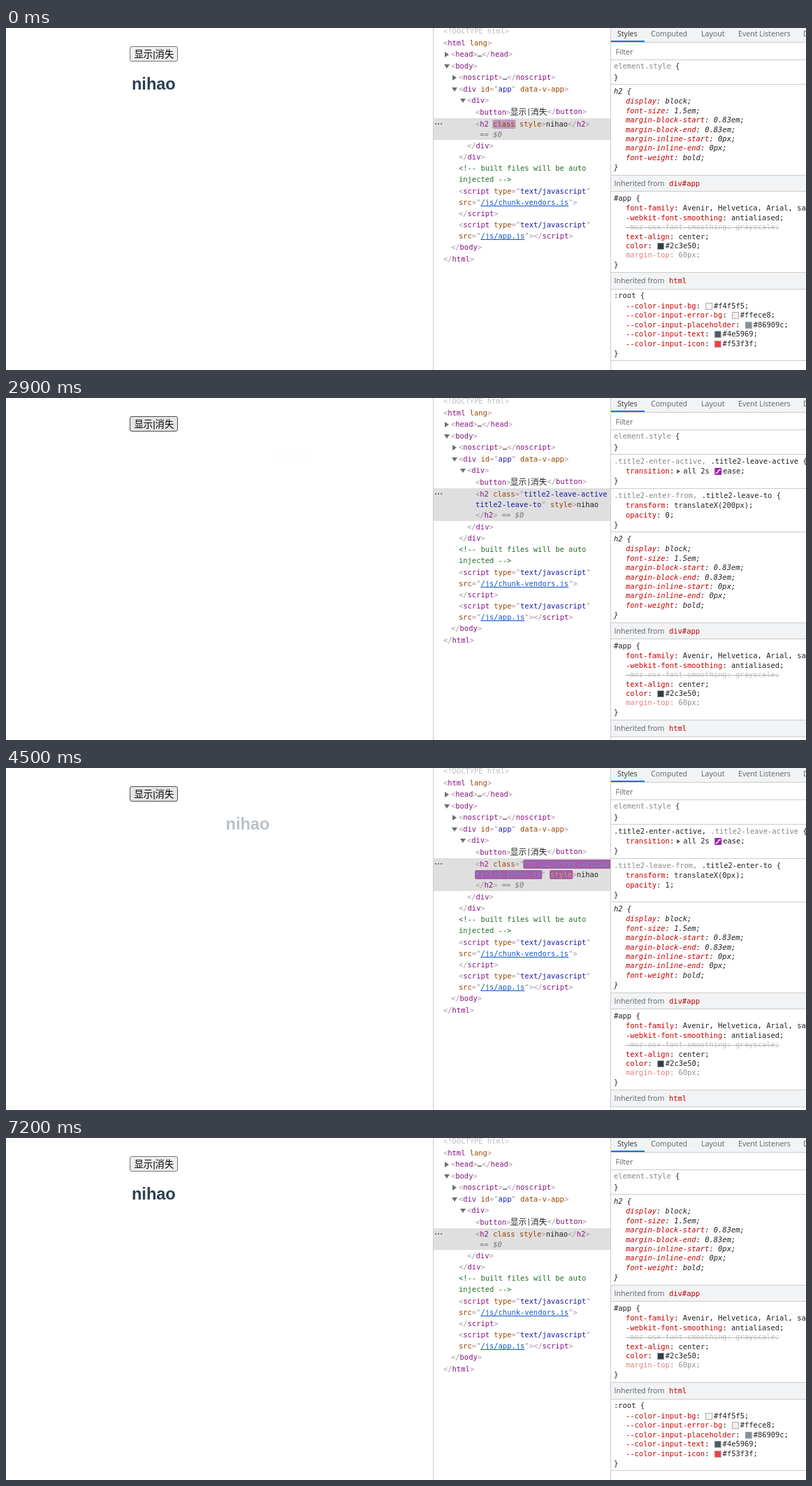
Animation of 1145 by 489 pixels, one loop 7400 ms. Source, as an HTML page with a canvas:

```html
<!DOCTYPE html>
<html lang="en">
<head>
<meta charset="utf-8">
<title>Transition inspector</title>
<style>
html, body { margin: 0; width: 100%; height: 100%; overflow: hidden; background: #fff; }
canvas { display: block; }
</style>
</head>
<body>
<canvas id="stage" width="1145" height="489"></canvas>
<script>
const ctx = document.getElementById('stage').getContext('2d');
const LOOP = 7400, STEP = 100, CELL = 6.29;
const MONO = '10.45px "DejaVu Sans Mono", monospace';
const UI = '10.6px "Open Sans", sans-serif';
const CJK = '"Noto Sans CJK SC", "Noto Sans CJK", sans-serif';

// One-letter colour codes used after "~" in marked-up text; capitals flash.
const INK = {
  b: '#a894a6', t: '#881280', a: '#994500', v: '#1a1aa6', c: '#236e25', l: '#1155cc',
  d: '#c0c0c0', g: '#777', s: '#777', x: '#222', u: '#888', p: '#c80000'
};

// The inspected element in each phase of the transition.
const classed = kind => [
  `~b<~th2 ~aclass~b="~Vtitle2-${kind}-active `,
  `~Vtitle2-${kind}-to~b" ~${kind === 'enter' ? 'A' : 'a'}style~b>~xnihao`,
  '~b</~th2~b>~g == ~s$0'
];
const SHOWN = ['~b<~th2 ~Aclass~a style~b>~xnihao~b</~th2~b>', '~g == ~s$0'];
const HIDDEN = ['~b<~th2 ~Aclass~a style~b="~Vdisplay: non', '~Ve;~b">~xnihao~b</~th2~b>~g == ~s$0'];
const PHASES = [
  { at: -1000, rows: SHOWN, kind: 'shown' },
  { at: 1300, rows: classed('leave'), kind: 'leave' },
  { at: 3100, rows: HIDDEN, kind: 'hidden' },
  { at: 4200, rows: classed('enter'), kind: 'enter' },
  { at: 6100, rows: SHOWN, kind: 'shown' }
];

// Rows above and below the inspected element: x, marked-up text, arrow.
const ABOVE = [
  [626, '~d<!DOCTYPE html>'],
  [626, '~b<~thtml ~alang~b>'],
  [637, '~b<~thead~b>~x…~b</~thead~b>', 'right'],
  [637, '~b<~tbody~b>', 'down'],
  [648, '~b<~tnoscript~b>~x…~b</~tnoscript~b>', 'right'],
  [648, '~b<~tdiv ~aid~b="~vapp~b" ~adata-v-app~b>', 'down'],
  [660, '~b<~tdiv~b>', 'down'],
  [672, '~b<~tbutton~b>']
];
const SCRIPT = '~b<~tscript ~atype~b="~vtext/javascript~b"';
const BELOW = [
  [660, '~b</~tdiv~b>'],
  [648, '~b</~tdiv~b>'],
  [648, '~c<!-- built files will be auto'],
  [648, '~cinjected -->'],
  [648, SCRIPT],
  [648, '~asrc~b="~l/js/chunk-vendors.js~b">'],
  [648, '~b</~tscript~b>'],
  [648, SCRIPT],
  [648, '~asrc~b="~l/js/app.js~b"></~tscript~b>'],
  [637, '~b</~tbody~b>'],
  [626, '~b</~thtml~b>']
];

// Declarations: "/" is struck out, "?" is faded.
const H2 = ['display: block;', 'font-size: 1.5em;', 'margin-block-start: 0.83em;',
  'margin-block-end: 0.83em;', 'margin-inline-start: 0px;', 'margin-inline-end: 0px;',
  'font-weight: bold;'];
const APP = ['font-family: Avenir, Helvetica, Arial, sans-serif;', '-webkit-font-smoothing: antialiased;',
  '?/-moz-osx-font-smoothing: grayscale;', 'text-align: center;', 'color: #2c3e50;', '?margin-top: 60px;'];
const ROOT = ['--color-input-bg: #f4f5f5;', '--color-input-error-bg: #ffece8;',
  '--color-input-placeholder: #86909c;', '--color-input-text: #4e5969;', '--color-input-icon: #f53f3f;'];

function rect(x, y, w, h, color) {
  ctx.fillStyle = color;
  ctx.fillRect(x, y, w, h);
}

function text(str, x, y, color, font = MONO) {
  ctx.font = font;
  ctx.fillStyle = color;
  ctx.fillText(str, x, Math.round(y) + (font.includes('Mono') ? 3 : 4));
}

function shape(color, ...points) {
  ctx.fillStyle = color;
  ctx.beginPath();
  points.forEach(([x, y]) => ctx.lineTo(x, y));
  ctx.fill();
}

function box(x, y, w, h, r, fill, stroke) {
  ctx.beginPath();
  ctx.roundRect(x, y, w, h, r);
  ctx.fillStyle = fill;
  ctx.fill();
  if (!stroke) return;
  ctx.strokeStyle = stroke;
  ctx.lineWidth = 1;
  ctx.stroke();
}

function marked(str, x, y, { italic = false, age = Infinity } = {}) {
  for (const part of str.split('~').slice(1)) {
    const code = part[0], body = part.slice(1), key = code.toLowerCase();
    const width = body.length * CELL;
    const flashing = code !== key && age < 1100;
    if (flashing) {
      ctx.globalAlpha = 1 / (1 + 1.8 * age / 1000);
      box(x - 1, y - 7, width + 2, 13, 2, '#881a88');
      ctx.globalAlpha = 1;
    }
    const font = (italic || key === 's' ? 'italic ' : '') + MONO;
    text(body, x, y, INK[key], font);
    if (flashing) {
      ctx.globalAlpha = Math.max(0, 1 - age / 600);
      text(body, x, y, '#fff', font);
      ctx.globalAlpha = 1;
    }
    if (key === 'l') rect(x, y + 4, width, 1, INK.l);
    x += width;
  }
}

function ease(t) {
  t = Math.min(1, Math.max(0, t));
  const cubic = (s, a, b) => 3 * (1 - s) ** 2 * s * a + 3 * (1 - s) * s * s * b + s ** 3;
  let lo = 0, hi = 1;
  for (let i = 0; i < 24; i++) {
    const mid = (lo + hi) / 2;
    if (cubic(mid, 0.25, 0.25) < t) lo = mid; else hi = mid;
  }
  return cubic(lo, 0.1, 1);
}

function drawPage(t, kind) {
  const hover = (t >= 500 && t < 4000) || (t >= 4200 && t < 6400);
  box(177.5, 26.5, 68, 21, 2.5, hover ? '#e5e5e5' : '#efefef', hover ? '#4f4f4f' : '#767676');
  text('显示|消失', 183.5, 38, '#000', `13.33px "Liberation Sans", ${CJK}`);

  let away = 0;
  if (kind === 'leave') away = ease((t - 1200) / 2000);
  if (kind === 'enter') away = 1 - ease((t - 4100) / 1870);
  if (kind === 'hidden') away = 1;
  ctx.globalAlpha = 1 - away;
  text('nihao', 180 + 200 * away, 84, '#2c3e50', 'bold 23.5px "Liberation Sans", Arial, sans-serif');
  ctx.globalAlpha = 1;
}

function drawElements(phase, age) {
  const { rows } = phase;
  rect(611, 0, 1, 489, '#ccc');
  rect(612, 129, 253, rows.length === 3 ? 47 : 31, '#dfdfdf');
  for (let i = 0; i < 3; i++) rect(614 + i * 4, 136, 2, 2, '#777');

  ABOVE.forEach(([x, str, arrow], i) => {
    const y = Math.round(5 + i * 16.5);
    marked(str, x, y);
    if (arrow === 'right') shape('#6e6e6e', [x - 9, y - 4], [x - 3, y], [x - 9, y + 4]);
    if (arrow === 'down') shape('#6e6e6e', [x - 10, y - 3], [x - 2, y - 3], [x - 6, y + 3]);
  });
  text('显示', 721.8, 120, INK.x, '11.7px ' + CJK);
  text('|', 745, 120, INK.x);
  text('消失', 751, 120, INK.x, '11.7px ' + CJK);
  marked('~b</~tbutton~b>', 774.5, 120);

  rows.forEach((str, i) => marked(str, 672, Math.round(137.6 + i * 15.4), { age }));
  const top = rows.length === 3 ? 185 : 169;
  BELOW.forEach(([x, str], i) => marked(str, x, Math.round(top + i * 16.15)));
}

function swatch(x, y, color) {
  rect(x + 1, y - 5, 10, 10, '#aaa');
  rect(x + 2, y - 4, 8, 8, color);
}

function declaration(line, y, italic) {
  const flags = line.match(/^[?\/]*/)[0];
  const body = line.slice(flags.length);
  const faded = flags.includes('?'), struck = flags.includes('/');
  const font = (italic ? 'italic ' : '') + MONO;
  const split = body.indexOf(':');
  const gray = faded && struck;
  let x = 887;
  ctx.globalAlpha = faded ? 0.5 : 1;
  text(body.slice(0, split), x, y, gray ? '#888' : INK.p, font);
  x += split * CELL;
  for (const part of body.slice(split).split(/(▸ |#\w{6};|ease;)/)) {
    if (part === '▸ ') {
      shape('#555', [x + 4, y - 3], [x + 9, y], [x + 4, y + 3]);
      x += 13;
      continue;
    }
    if (part[0] === '#') {
      swatch(x, y, part.slice(0, 7));
      x += 12.8;
    } else if (part === 'ease;') {
      box(x + 1, y - 5, 10, 10, 1, '#9c27b0');
      ctx.strokeStyle = '#fff';
      ctx.lineWidth = 1.3;
      ctx.beginPath();
      ctx.moveTo(x + 2.5, y + 2.5);
      ctx.bezierCurveTo(x + 8, y + 2.5, x + 4, y - 2.5, x + 9.5, y - 2.5);
      ctx.stroke();
      x += 13;
    }
    text(part, x, y, gray ? '#888' : INK.x, font);
    x += part.length * CELL;
  }
  if (struck) rect(887, y, body.length * CELL, 1, gray ? '#777' : '#222');
  ctx.globalAlpha = 1;
}

function drawStyles(t, kind) {
  rect(865, 0, 1, 489, '#ccc');
  rect(866, 0, 279, 489, '#fff');
  rect(866, 0, 279, 20, '#f1f3f4');
  rect(866, 20, 279, 1, '#ccc');
  rect(866, 18, 48, 2, '#1a73e8');
  [['Styles', 875], ['Computed', 923], ['Layout', 995], ['Event Listeners', 1048], ['DOM', 1141]]
    .forEach(([label, x], i) => text(label, x, 8, i ? '#5f6368' : '#333', UI));
  text('Filter', 872.5, 34, '#5f6368', UI);

  let y = 45;
  const rule = () => rect(866, Math.round(y), 279, 1, '#ccc');
  const section = (selector, lines, italic = false) => {
    marked(selector + ' ~x{', 870, Math.round(y + 10.3), { italic });
    lines.forEach((line, i) => declaration(line, Math.round(y + 25 + i * 13.4), italic));
    marked('~x}', 870, Math.round(y + 25.5 + lines.length * 13.4), { italic });
    y += 35.4 + lines.length * 13.4;
    rule();
  };
  const inherited = name => {
    rect(866, Math.round(y) + 1, 279, 23, '#f1f3f4');
    text('Inherited from', 870.5, y + 12, '#5f6368', UI);
    text(name, 949, y + 13, INK.p);
    y += 23.8;
    rule();
  };

  rule();
  section('~uelement.style', kind === 'hidden' ? ['display: none;'] : []);
  if (kind === 'leave' || kind === 'enter') {
    const entering = kind === 'enter';
    const pair = (first, second, firstOn) =>
      `~${firstOn ? 'x' : 'u'}.title2-${first}, ~${firstOn ? 'u' : 'x'}.title2-${second}`;
    section(pair('enter-active', 'leave-active', entering), ['transition:▸ all 2s ease;']);
    if (entering || t < 1400)
      section(pair('leave-from', 'enter-to', !entering), ['transform: translateX(0px);', 'opacity: 1;']);
    else
      section(pair('enter-from', 'leave-to', false), ['transform: translateX(200px);', 'opacity: 0;']);
  }
  section('~xh2', kind === 'hidden' ? ['/' + H2[0], ...H2.slice(1)] : H2, true);
  inherited('div#app');
  section('~x#app', APP);
  inherited('html');
  section('~x:root', ROOT);
}

function frame(now) {
  const t = Math.floor(now % LOOP / STEP) * STEP;
  const phase = PHASES.filter(p => p.at <= t).pop();
  rect(0, 0, 1145, 489, '#fff');
  drawPage(t, phase.kind);
  drawElements(phase, t - phase.at);
  drawStyles(t, phase.kind);
  requestAnimationFrame(frame);
}
requestAnimationFrame(frame);
</script>
</body>
</html>
```
